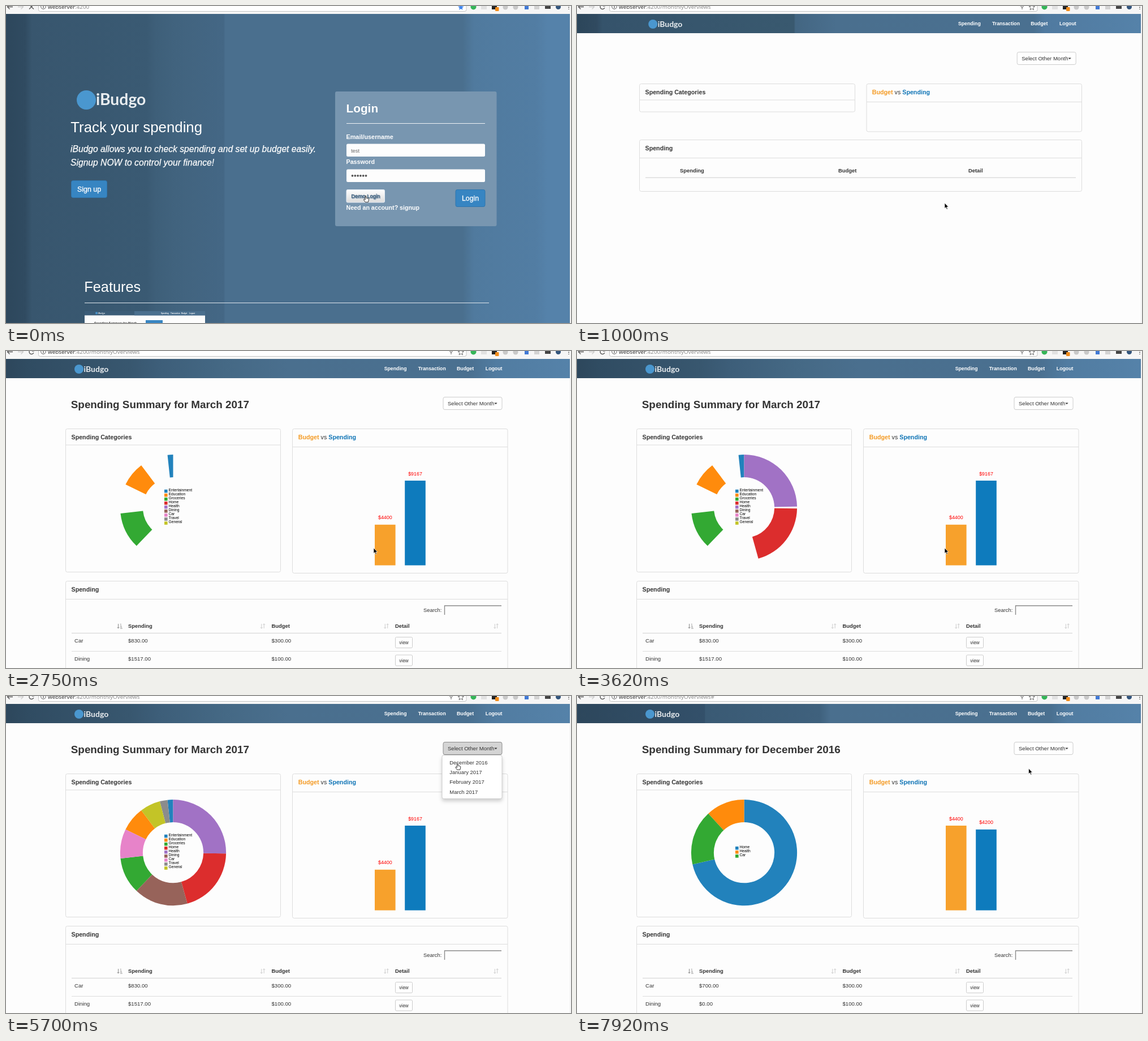
Write an HTML page that moves like this. It is 999 px wide and 560 px high and loops after 8000 ms.

```html
<!DOCTYPE html>
<html lang="en">
<head>
<meta charset="utf-8">
<title>Spending summary</title>
<style>
html, body { margin: 0; width: 100%; height: 100%; overflow: hidden; background: #fdfdfd; }
svg { display: block; width: 999px; height: 560px; font-family: "Liberation Sans", Arial, sans-serif; fill: #333; }
text { white-space: pre; }
.b { font-weight: bold; }
.w { fill: #fff; }
.mid { text-anchor: middle; }
.brand { font-family: Lato, sans-serif; font-weight: bold; fill: #e9edf0; }
.url { font: 9.8px "Noto Sans", sans-serif; fill: #8c8c8c; }
.nav { font-size: 8.75px; font-weight: bold; fill: #fff; }
.head { font-size: 10.7px; font-weight: bold; }
.th { font-size: 9.4px; font-weight: bold; }
.td { font-size: 9.6px; }
.box { fill: #fdfdfd; stroke: #ddd; }
.rule { stroke: #ddd; fill: none; }
.btn { fill: #fff; stroke: #ccc; }
.blue { fill: #3785c2; stroke: #2f76ae; }
.cap { fill: #fff; stroke: #fff; stroke-width: .3; }
.field { fill: #fdfdfd; }
.legend { font-size: 6.7px; fill: #000; }
.val { font-size: 8.9px; fill: #f00; text-anchor: middle; }
.glow { text-shadow: 1px 1px 1px #6f8ba5; }
.menu { filter: drop-shadow(0 4px 3px rgba(0,0,0,.18)); }
.ico { fill: none; stroke: #5a5a5a; stroke-width: 1.4; }
</style>
</head>
<body>
<svg viewBox="0 0 999 560">
  <defs>
    <linearGradient id="sky">
      <stop offset="0" stop-color="#2d475c"/><stop offset=".034" stop-color="#304b61"/>
      <stop offset=".046" stop-color="#38566e"/><stop offset=".25" stop-color="#3a5a73"/>
      <stop offset=".265" stop-color="#3e5f79"/><stop offset=".3" stop-color="#41637e"/>
      <stop offset=".386" stop-color="#446785"/><stop offset=".389" stop-color="#4a6f8e"/>
      <stop offset=".81" stop-color="#4a6f8e"/>
      <stop offset=".83" stop-color="#507a9e"/><stop offset=".94" stop-color="#527da3"/>
      <stop offset=".96" stop-color="#5582aa"/><stop offset="1" stop-color="#5582aa"/>
    </linearGradient>
    <linearGradient id="nav1">
      <stop offset="0" stop-color="#2c465a"/><stop offset=".035" stop-color="#304a60"/>
      <stop offset=".045" stop-color="#35536b"/><stop offset=".385" stop-color="#39596f"/>
      <stop offset=".387" stop-color="#436682"/><stop offset=".46" stop-color="#4a6f8e"/>
      <stop offset=".81" stop-color="#4a7090"/><stop offset=".83" stop-color="#507aa0"/>
      <stop offset="1" stop-color="#5582a9"/>
    </linearGradient>
    <linearGradient id="nav2">
      <stop offset="0" stop-color="#2d475c"/><stop offset=".04" stop-color="#304c62"/>
      <stop offset=".22" stop-color="#38576f"/><stop offset=".27" stop-color="#3d5e79"/>
      <stop offset=".39" stop-color="#456985"/><stop offset=".5" stop-color="#4a6f8e"/>
      <stop offset=".82" stop-color="#4a7090"/><stop offset=".87" stop-color="#517ca1"/>
      <stop offset="1" stop-color="#5582a9"/>
    </linearGradient>
    <linearGradient id="nav3">
      <stop offset="0" stop-color="#2d475c"/><stop offset=".226" stop-color="#33506a"/>
      <stop offset=".228" stop-color="#3a5a74"/><stop offset=".43" stop-color="#3f617d"/>
      <stop offset=".45" stop-color="#4a6f8e"/><stop offset=".84" stop-color="#4a7090"/>
      <stop offset=".87" stop-color="#517ca1"/><stop offset="1" stop-color="#5582a9"/>
    </linearGradient>
    <linearGradient id="shine" x2="0" y2="1">
      <stop offset="0" stop-color="#fff"/><stop offset="1" stop-color="#dcdcdc"/>
    </linearGradient>
    <path id="arrow" d="M0 0V9.6L2.2 7.6 3.8 11.2 5.3 10.5 3.8 7.1H6.8Z" fill="#000" stroke="#fff" stroke-width=".7"/>
    <path id="hand" d="M-.9 .8Q0-.6 .9 .8V4.2L4.6 5Q5.6 5.4 5.4 7L4.5 11.4H-.8L-3.6 7.4Q-3.6 6-2.4 6.4L-.9 7.4Z" fill="#fff" stroke="#222" stroke-width=".9"/>
    <g id="sort" fill="none" stroke="#ccc">
      <path d="M-2.2-4V4M-4 2.2-2.2 4.2-.4 2.2M2.2 4V-4M.4-2.2 2.2-4.2 4-2.2"/>
    </g>
  </defs>

  <rect width="999" height="560" fill="#fdfdfd"/>

  <g id="login">
    <rect y="13" width="997" height="547" fill="url(#sky)"/>
    <circle cx="142" cy="166" r="17" fill="#4a97cf"/>
    <text class="brand" x="159" y="175" font-size="28.3">iBudgo</text>
    <g class="w">
      <text x="114.3" y="223" font-size="25.8">Track your spending</text>
      <g font-size="15.66" font-style="italic" stroke="#fff" stroke-width=".25">
        <text x="114" y="258">iBudgo allows you to check spending and set up budget easily.</text>
        <text x="114" y="282">Signup NOW to control your finance!</text>
      </g>
      <rect class="blue" x="115.5" y="308.5" width="63" height="30" rx="3"/>
      <text class="cap" x="126" y="328" font-size="12.4">Sign up</text>
      <text x="138.3" y="505" font-size="25.3">Features</text>
    </g>
    <path d="M139 524.5H854" stroke="#dfe6ec"/>
    <rect x="139" y="539" width="213" height="21" fill="#fdfdfd"/>
    <rect x="139" y="539" width="213" height="7.5" fill="#3c5d78"/>
    <rect x="227" y="539" width="125" height="7.5" fill="#4a6f8e"/>
    <circle cx="160" cy="542.5" r="2" fill="#4a97cf"/>
    <text class="brand" x="162.5" y="544" font-size="4">iBudgo</text>
    <g class="w b" font-size="3">
      <text x="274" y="543.5">Spending</text><text x="291" y="543.5">Transaction</text>
      <text x="310" y="543.5">Budget</text><text x="324" y="543.5">Logout</text>
    </g>
    <text class="b" x="156" y="561.5" font-size="5.3">Spending Summary for March</text>
    <rect x="247" y="555" width="30" height="6" fill="#3785c2"/>
    <rect x="582" y="151" width="285.5" height="238" rx="3" fill="#7896b0"/>
    <g class="w b">
      <text x="601.5" y="188" font-size="20.8">Login</text>
      <text x="601.5" y="234.5" font-size="10.85">Email/username</text>
      <text x="601.5" y="279" font-size="10.7">Password</text>
      <text x="601.5" y="360" font-size="10.65">Need an account? signup</text>
    </g>
    <path d="M602 207.5H847" stroke="#eef2f5"/>
    <rect class="field" x="602" y="243.5" width="245" height="22.5" rx="2.5"/>
    <text x="610" y="258.5" font-size="9.4" fill="#666">test</text>
    <rect class="field" x="602" y="288.5" width="245" height="22.5" rx="2.5"/>
    <path d="M612.5 299.8h24.5" stroke="#555" stroke-width="3.8" stroke-linecap="round" stroke-dasharray="0 4.8"/>
    <rect x="602" y="324.5" width="67.5" height="22.5" rx="2" fill="url(#shine)" stroke="#e6eef7"/>
    <text id="demo" x="610.3" y="339.2" font-size="9.46" fill="#3f5f7b" stroke="#3f5f7b" stroke-width=".3">Demo Login</text>
    <rect class="blue" x="795" y="324.5" width="52" height="30" rx="3"/>
    <text class="cap" x="806" y="343.5" font-size="12.3">Login</text>
  </g>

  <g id="app">
    <rect id="bar" y="13" width="997" height="35"/>
    <g id="head">
      <circle cx="129" cy="32" r="8" fill="#4a97cf"/>
      <text class="brand" x="137.5" y="37" font-size="14">iBudgo</text>
      <g class="nav">
        <text x="668.7" y="34">Spending</text><text x="728.7" y="34">Transaction</text>
        <text x="797" y="34">Budget</text><text x="847.8" y="34">Logout</text>
      </g>
      <rect id="month" class="btn" x="773" y="81.5" width="104" height="22" rx="3"/>
      <text x="781" y="95.6" font-size="9.55">Select Other Month</text>
      <path d="M863.5 91.5h5l-2.5 2.7z"/>
    </g>

    <g id="empty">
      <rect class="box" x="110.5" y="137.5" width="381" height="49.5" rx="3"/>
      <rect class="box" x="512" y="137.5" width="380.5" height="84.5" rx="3"/>
      <rect class="box" x="110.5" y="236.5" width="782" height="91" rx="3"/>
      <path class="rule" d="M111 166H491M512 169.5H892M111 268.5H892"/>
      <path class="rule" stroke-width="1.5" d="M121 303.3H882"/>
      <g class="head">
        <text x="120.5" y="156">Spending Categories</text>
        <text x="521.8" y="156"><tspan fill="#f49a23">Budget</tspan><tspan font-weight="normal"> vs </tspan><tspan fill="#0d73b5">Spending</tspan></text>
        <text x="120.5" y="255">Spending</text>
      </g>
      <g class="th">
        <text x="182" y="294">Spending</text><text x="462" y="294">Budget</text><text x="692" y="294">Detail</text>
      </g>
    </g>

    <g id="full">
      <text id="title" class="b" x="114.8" y="100.7" font-size="18.85"></text>
      <rect class="box" x="105.5" y="137.5" width="380" height="253" rx="3"/>
      <rect class="box" x="506.5" y="137.5" width="380.5" height="255" rx="3"/>
      <rect class="box" x="105.5" y="406.5" width="781.5" height="170" rx="3"/>
      <path class="rule" d="M106 166H485M507 169.5H887M106 438.5H887M116 530.5H876"/>
      <path class="rule" stroke-width="1.6" d="M116 498.5H876"/>
      <g class="head">
        <text x="115.5" y="156">Spending Categories</text>
        <text x="516.8" y="156"><tspan fill="#f49a23">Budget</tspan><tspan font-weight="normal"> vs </tspan><tspan fill="#0d73b5">Spending</tspan></text>
        <text x="115.5" y="425">Spending</text>
      </g>
      <text x="738" y="461.2" font-size="9.4">Search:</text>
      <path d="M775.5 466V450H876" fill="none" stroke="#8a8a8a" stroke-width="1.4"/>
      <g fill="none" stroke="#8c8c8c"><path d="M198.5 482v8M196.7 488l1.8 2 1.8-2M202 482.5h1.5M202 485h2.3M202 487.5h3M202 490h3.8"/></g>
      <use href="#sort" x="454" y="486"/><use href="#sort" x="672.5" y="486"/><use href="#sort" x="866.5" y="486"/>
      <g class="th">
        <text x="216" y="489.3">Spending</text><text x="469.5" y="489.3">Budget</text><text x="688" y="489.3">Detail</text>
      </g>
      <g class="td">
        <text x="121" y="515.3">Car</text><text id="car" x="216" y="515.3"></text><text x="469.5" y="515.3">$300.00</text>
        <text x="121" y="546.8">Dining</text><text id="dining" x="216" y="546.8"></text><text x="469.5" y="546.8">$100.00</text>
      </g>
      <rect class="btn" x="688.5" y="505.5" width="30" height="19" rx="2"/>
      <rect class="btn" x="688.5" y="537" width="30" height="19" rx="2"/>
      <g class="mid" font-size="8.3"><text x="703.5" y="518">view</text><text x="703.5" y="549.5">view</text></g>
      <g id="charts"></g>
    </g>

    <g id="menu">
      <rect class="menu" x="771" y="104.5" width="106" height="77" rx="3" fill="#fff" stroke="#ccc"/>
      <g font-size="9.45">
        <text x="784.3" y="120.5">December 2016</text><text x="784.3" y="138">January 2017</text>
        <text x="784.3" y="155.4">February 2017</text><text x="784.3" y="172.7">March 2017</text>
      </g>
    </g>
  </g>

  <rect width="999" height="14" fill="#f6f6f6"/>
  <rect x="57.5" y="-12" width="756.5" height="21.5" rx="3" fill="#fff" stroke="#c4c4c4"/>
  <path class="ico" d="M12 1.5H3M6.5-3 2.5 1.5 6.5 5.5"/>
  <path class="ico" style="stroke:#ccc" d="M21 1.5H30M26.5-3 30.5 1.5 26.5 5.5"/>
  <path id="stop" class="ico" d="M41-2.5 49 5.5M49-2.5 41 5.5"/>
  <path id="reload" class="ico" d="M48.5-.5A4 4 0 1 0 48.8 3M49-3V0H46"/>
  <circle class="ico" style="stroke-width:1" cx="66" cy="1" r="4.3"/>
  <path class="ico" d="M66 .3V3.5"/>
  <text class="url" x="74" y="5"><tspan fill="#333">webserver</tspan>:4200<tspan id="path"></tspan></text>
  <g id="key" class="ico" style="stroke-width:1"><circle cx="787" cy="0" r="2.2"/><path d="M787 2V6"/></g>
  <path id="star" d="M804.3-3l1.5 3.4 3.7.4-2.8 2.4.8 3.6-3.2-1.9-3.2 1.9.8-3.6-2.8-2.4 3.7-.4z"/>
  <circle cx="826.5" cy="1.5" r="5" fill="#35b558"/>
  <rect x="840" y="-2" width="10" height="8" fill="#e2e2e2"/>
  <rect x="859" y="-3" width="9" height="9" fill="#222"/>
  <rect x="865" y="2" width="6.5" height="7" rx="1" fill="#f28c1b"/>
  <circle cx="883" cy="2" r="4.5" fill="#c9c9c9"/>
  <circle cx="901" cy="2" r="4.5" fill="#c9c9c9"/>
  <rect x="917" y="-2" width="7" height="8" fill="#4179d6"/>
  <rect x="934" y="-2" width="9" height="8" fill="#d3d3d3"/>
  <rect x="953" y="0" width="10" height="5" fill="#444"/>
  <circle cx="976.5" cy="1.5" r="4.5" fill="#33557c"/>
  <path d="M995-2v8" stroke="#666" stroke-width="1.8" stroke-dasharray="1.8 1.7"/>
  <path d="M997.5 14V560" stroke="#e9e9e9"/>
  <use id="cursor"/>
</svg>
<script>
const $ = id => document.getElementById(id);
const LOOP = 8000;
const COLORS = ['#2282bc', '#ff8b0c', '#33a933', '#dc2d2d', '#a172c5', '#97635a', '#e783c9', '#8c8c8c', '#c3c427'];

// slices: [label, start angle, end angle]; clock: [time, slice phase]
const MARCH = {
  title: 'March 2017', car: '$830.00', dining: '$1517.00',
  slices: [['Entertainment', 353.9, 360], ['Education', 296, 323], ['Groceries', 223.7, 263.7],
    ['Home', 91, 164.4], ['Health', 0, 91], ['Dining', 164.4, 223.7], ['Car', 263.7, 296],
    ['Travel', 345.4, 353.9], ['General', 323, 345.4]],
  clock: [[1285, 0], [2010, 1.485], [3620, 4.8], [4360, 6.24], [5550, 8.46], [5700, 9]],
  bars: [4400, 9167], barStart: 1320
};
const DECEMBER = {
  title: 'December 2016', car: '$700.00', dining: '$0.00',
  slices: [['Home', 0, 257.2], ['Health', 317.4, 360], ['Car', 257.2, 317.4]],
  clock: [[6444, 0], [7900, 3]],
  bars: [4400, 4200], barStart: 6525
};
const BAR_TIME = 600;

// screen refreshes: [time, number of equal steps up to the next entry]
const TICKS = [[0, 1], [150, 1], [410, 2], [710, 2], [1000, 7], [2010, 8], [3190, 8], [4360, 8],
  [5550, 7], [6590, 7], [7620, 3], [8070, 1]];
const CURSOR = [[0, 636, 335], [150, 643, 341], [410, 650, 348], [3700, 650, 348], [4360, 756, 157],
  [4800, 826, 92], [5400, 826, 92], [5550, 838, 106], [5700, 798, 119], [7300, 797.5, 119], [7600, 798.5, 128]];

const clamp = v => Math.min(1, Math.max(0, v));
const ease = v => (v = clamp(v)) < .5 ? 4 * v ** 3 : 1 - 4 * (1 - v) ** 3;

function snap(t) {
  const i = TICKS.findIndex(k => k[0] > t) - 1;
  const [from, n] = TICKS[i], step = (TICKS[i + 1][0] - from) / n;
  return from + Math.min(n - 1, Math.floor((t - from) / step + .12)) * step;
}

function along(stops, t) {
  let i = 0;
  while (i < stops.length - 2 && t >= stops[i + 1][0]) i++;
  const a = stops[i], b = stops[i + 1], k = clamp((t - a[0]) / (b[0] - a[0]));
  return a.slice(1).map((v, j) => v + (b[j + 1] - v) * k);
}

function ring(from, to) {
  const pt = (r, deg) => {
    const a = deg * Math.PI / 180;
    return (295.5 + r * Math.sin(a)).toFixed(2) + ' ' + (276.7 - r * Math.cos(a)).toFixed(2);
  };
  const big = to - from > 180 ? 1 : 0;
  return `M${pt(93.6, from)}A93.6 93.6 0 ${big} 1 ${pt(93.6, to)}L${pt(53.6, to)}A53.6 53.6 0 ${big} 0 ${pt(53.6, from)}Z`;
}

function charts(m, t) {
  const [phase] = along(m.clock, t), n = m.slices.length;
  let out = '';
  m.slices.forEach(([name, from, to], i) => {
    const k = ease(phase - i), y = 274.5 + (i - (n - 1) / 2) * 7.05;
    if (k > 0) out += `<path d="${ring(from, from + (to - from) * k)}" fill="${COLORS[i]}"/>`;
    out += `<rect x="280" y="${y - 1.5}" width="5.6" height="5.6" fill="${COLORS[i]}"/>` +
      `<text class="legend" x="287.5" y="${y + 1.7}">${name}</text>`;
  });
  const max = Math.max(...m.bars);
  m.bars.forEach((v, i) => {
    const k = (t - m.barStart) / BAR_TIME - i;
    if (k <= 0) return;
    const full = 149.6 * v / max, h = full * ease(k), x = 652 + i * 53.2;
    out += `<rect x="${x}" y="${378.6 - h}" width="36.6" height="${h}" fill="${i ? '#0e7bbd' : '#f7a12c'}"/>` +
      `<text class="val" x="${x + 18.3}" y="${369.1 - full}">$${v}</text>`;
  });
  return out;
}

const show = (id, on) => $(id).style.display = on ? '' : 'none';

function render(now) {
  const t = snap(now);
  const loaded = t >= 1000, ready = t >= 1280, picked = t >= 6280;
  const open = t >= 5090 && t < 6130, over = t >= 4640 && t < 6130;
  show('login', !loaded);
  show('app', loaded);
  show('empty', !ready);
  show('full', ready);
  show('menu', open);
  show('stop', !loaded);
  show('reload', loaded);
  show('key', t >= 710);
  $('demo').setAttribute('class', t < 150 ? 'glow' : '');
  $('path').textContent = t < 710 ? '' : '/monthlyOverviews' + (t >= 6130 ? '#' : '');
  $('star').setAttribute('style', t < 710 ? 'fill:#3f86f0' : 'fill:none;stroke:#666');
  $('bar').setAttribute('fill', `url(#nav${!ready ? 1 : t < 6130 ? 2 : 3})`);
  $('head').setAttribute('transform', `translate(${ready ? 0 : 5.2})`);
  $('month').setAttribute('style', open ? 'fill:#d4d4d4;stroke:#8c8c8c' : over ? 'fill:#e6e6e6;stroke:#adadad' : '');

  const m = t >= 6580 ? DECEMBER : MARCH;
  $('title').textContent = 'Spending Summary for ' + (picked ? DECEMBER : MARCH).title;
  $('car').textContent = m.car;
  $('dining').textContent = m.dining;
  $('charts').innerHTML = ready ? charts(m, t) : '';

  const [x, y] = along(CURSOR, t);
  const hand = t < 410 || (t >= 4640 && t < 6580);
  $('cursor').setAttribute('href', hand ? '#hand' : '#arrow');
  $('cursor').setAttribute('transform', `translate(${x} ${y})`);
}

const start = performance.now();
function loop() {
  render((performance.now() - start) % LOOP);
  requestAnimationFrame(loop);
}
loop();
</script>
</body>
</html>
```
